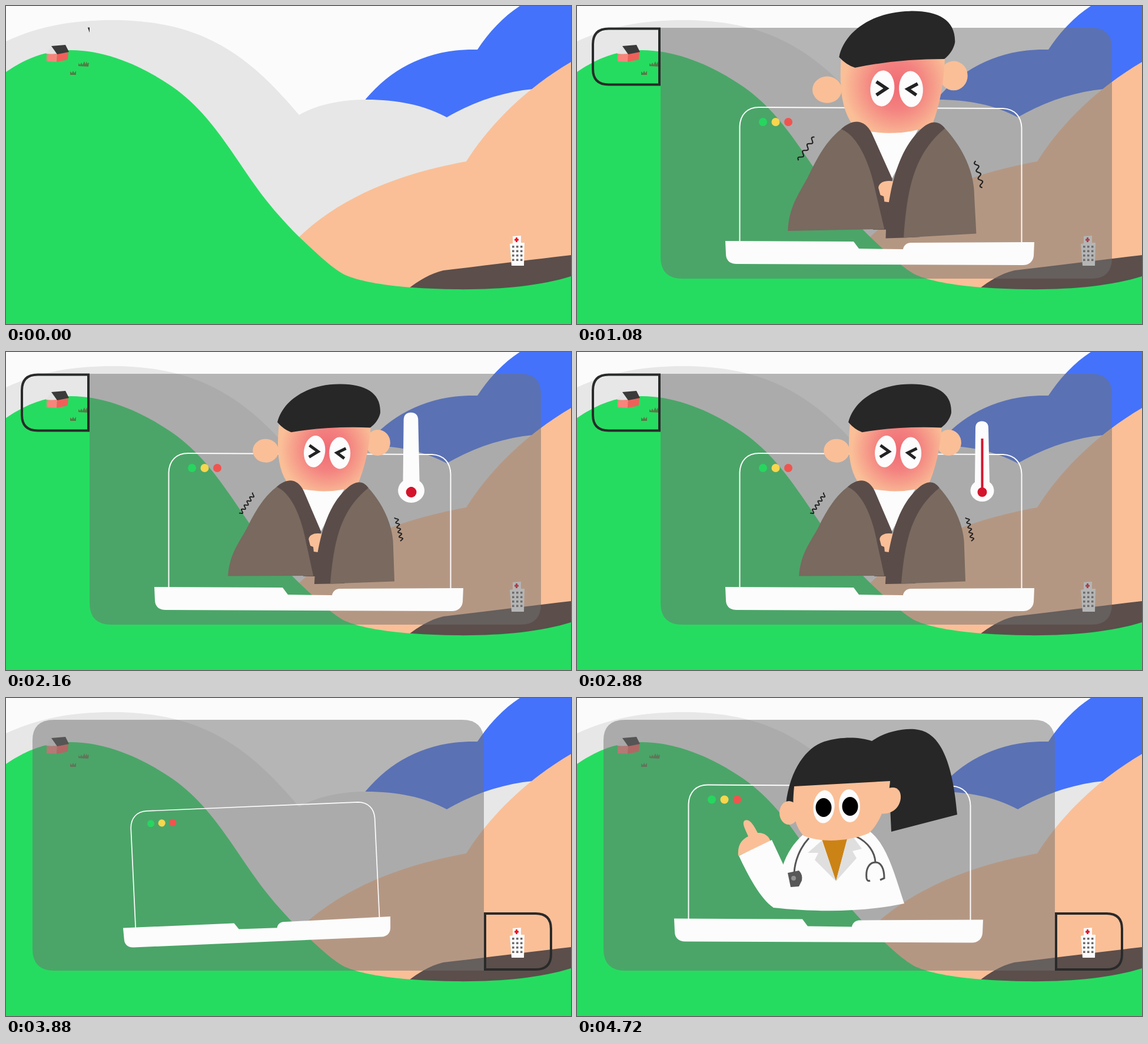
Recreate the animation shown at these times as an HTML page. Size 960x540 px, loop 4760 ms.

```html
<!DOCTYPE html>
<html lang="en">
<head>
<meta charset="utf-8">
<title>Remote consultation</title>
<style>
html, body { margin: 0; width: 100%; height: 100%; overflow: hidden; background: #fbfbfb; }
svg { display: block; width: 100%; height: 100%; }
.frame { fill: none; stroke: #292a2a; stroke-width: 4; }
.panel { fill: #707070; fill-opacity: .5; }
.skin { fill: #fabf97; }
.white { fill: #fcfcfc; }
.dark { fill: #272727; }
.line { fill: none; }
</style>
</head>
<body>
<svg viewBox="0 0 960 540" xmlns="http://www.w3.org/2000/svg">
<defs>
  <radialGradient id="fever" gradientUnits="userSpaceOnUse" cx="541" cy="165" r="80">
    <stop offset="0" stop-color="#f16a74"/>
    <stop offset=".45" stop-color="#f38280"/>
    <stop offset="1" stop-color="#fabf97"/>
  </radialGradient>
  <clipPath id="clipFrame"><polygon/></clipPath>
  <clipPath id="clipPanel"><polygon/></clipPath>
  <g id="laptop">
    <path class="line" stroke="#fcfcfc" stroke-width="2" d="M276.500 402V205C277 184 290 172 309 172L724 174C744 175 755 188 755.500 207V403"/>
    <path class="white" d="M252 399L470 400L479 412L554 413C555 407 559 403 566 402L777 401L776 424C775 434 768 440 758 440L271 438C259 438 253 431 253 421Z"/>
    <circle cx="316" cy="197" r="7" fill="#26d65f"/>
    <circle cx="337.500" cy="197" r="7" fill="#f8d64e"/>
    <circle cx="359" cy="197" r="7" fill="#f0544f"/>
  </g>
</defs>

<g id="land">
  <path fill="#4472fa" d="M605 166C650 108 715 72 801 74C820 45 845 18 873 0H960V300H605Z"/>
  <path fill="#e7e7e7" d="M0 60C60 32 120 24 180 24C330 24 410 80 498 185C530 166 575 159 612 159C665 159 710 168 749 189C795 162 845 146 895 141L960 141V540H0Z"/>
  <path class="skin" d="M490 400C565 324 670 284 782 264C820 204 880 142 960 95V500H490Z"/>
  <path fill="#5b4e4b" d="M680 483C702 465 722 454 743 449C820 440 890 431 960 423V500H680Z"/>
  <path fill="#26dc60" d="M0 112C35 88 70 75 110 75C170 75 230 102 275 132C320 161 350 199 380 242C420 300 440 334 498 392C530 422 555 446 577 457C605 469 650 475 690 478C790 485 890 481 960 459V540H0Z"/>
  <path fill="#e2e2e2" d="M68 81L77 68L88 83Z"/>
  <path fill="#f7857c" d="M69 82L87 81L86 95L69 94Z"/>
  <path fill="#f0605a" d="M87 81L106 78L105 91L86 95Z"/>
  <path fill="#3a3a3a" d="M77 68L101 66L107 78L87 82Z"/>
  <path fill="#547b46" d="M123 102V97L126 100L128 96L130 100L133 94L135 99L137 94L138 98L141 96L140 103ZM109 117V111L112 114L114 110L116 114L119 110V117Z"/>
  <path class="white" d="M861 391L875 390L875 402L881 402L880 441L859 441L856 404L861 403Z"/>
  <path class="line" stroke="#e2142c" stroke-width="3" d="M864 397H871M867.500 393V401"/>
  <path id="windows" fill="#6b6666"/>
</g>

<g id="call1">
  <path class="panel" clip-path="url(#clipPanel)" d="M142 37H874Q909 37 909 72V428Q909 463 874 463H179Q142 463 142 426Z"/>
  <path class="frame" clip-path="url(#clipFrame)" d="M140 38.500H54Q27 38.500 27 65V107Q27 133.500 54 133.500H140Z"/>
  <g id="lap1"><use href="#laptop"/></g>
  <g id="man">
    <path class="white" d="M498 228L574 228L533 305L527 305Z"/>
    <g id="manHead">
      <ellipse class="skin" cx="436" cy="171" rx="22" ry="20"/>
      <ellipse class="skin" cx="626" cy="150" rx="21" ry="22"/>
      <path fill="url(#fever)" d="M457 122C454 170 458 205 478 228C510 239 560 240 594 223C605 195 612 160 613 118Z"/>
      <path class="dark" d="M454 122C462 83 505 54 560 53C602 52 629 66 628 100C626 110 620 119 612 125Q540 125 478 138Q465 134 454 122Z"/>
      <ellipse class="white" cx="519" cy="169" rx="18" ry="27" transform="rotate(5 519 169)"/>
      <ellipse class="white" cx="562" cy="170" rx="18" ry="27" transform="rotate(-3 562 170)"/>
      <path class="line" stroke="#222" stroke-width="5" d="M510 159L525 169L510 179M572 162L557 170L570 179"/>
      <path id="drop" fill="#4a86f0" d="M540 201C543 207 544 210 543 213Q540 218 537 213C536 210 537 207 540 201Z"/>
    </g>
    <path fill="#5a4c49" d="M457 230C475 214 492 215 503 236L534 305L526 381H505Z"/>
    <path fill="#79695f" d="M377 383C379 340 400 320 412 292C428 260 440 244 457 230C482 240 500 280 509 325L522 380Z"/>
    <path class="skin" d="M513 318C514 309 526 306 537 309L531 340L522 339L521 331L516 329Z"/>
    <path fill="#5a4c49" d="M524 394C526 330 540 265 575 232C590 217 603 216 613 229L575 392L551 393Z"/>
    <path fill="#79695f" d="M613 229C640 258 657 295 657 330L660 387L551 393C556 320 566 268 613 229Z"/>
    <path id="wave1" class="line" stroke="#1e1e1e" stroke-width="1.800"/>
    <path id="wave2" class="line" stroke="#1e1e1e" stroke-width="1.800"/>
  </g>
  <g id="thermo">
    <path class="white" d="M677 129Q677 118 688 117.500Q699 118 699 129L701 221A20 18.500 0 1 1 676 221Z"/>
    <path id="mercury" class="line" stroke="#d4142c" stroke-width="4"/>
    <circle cx="688.500" cy="238" r="8" fill="#d4142c"/>
  </g>
</g>

<g id="call2">
  <path class="panel" clip-path="url(#clipPanel)" d="M812 463H82Q45 463 45 426V72Q45 37 82 37H775Q812 37 812 74Z"/>
  <path class="frame" clip-path="url(#clipFrame)" d="M814 366H900Q926 366 926 392V435Q926 461 900 461H814Z"/>
  <g id="lap2"><use href="#laptop" x="-87" y="-24.500"/></g>
  <g id="doctor">
    <path class="white" d="M384 232C366 248 355 268 350 284L333 356C400 363 480 365 556 349C540 300 526 248 498 227Z"/>
    <g id="arm">
      <path class="skin" d="M274 268C272 248 282 239 291 235C287 225 279 212 285 208C294 204 301 218 307 229C318 228 327 235 329 244Z"/>
      <path class="white" d="M275 268L331 241L352 286L380 340L334 356C312 342 290 300 275 268Z"/>
    </g>
    <path fill="#cb8316" d="M416 240L460 237L440 311Z"/>
    <path fill="#dfdfdf" d="M416 242L440 311L404 275L410 263L392 263ZM459 239L467 233L484 256L468 260L475 272L440 311Z"/>
    <g class="line" stroke="#555" stroke-width="3">
      <path d="M394 238C378 255 370 278 369 297M474 235C495 245 506 262 507 279"/>
      <path d="M498 310Q493 312 492 306C490 288 498 279 507 279C517 279 522 290 522 306L515 309"/>
    </g>
    <path fill="#585858" d="M358 297L377 293Q384 300 382 310L377 320L363 321Z"/>
    <circle cx="368" cy="306" r="4" fill="#919191"/>
    <g id="docHead">
      <path class="dark" d="M355 180C362 120 390 84 420 74C450 65 480 66 501 73C525 56 560 50 580 54C616 60 638 105 646 198L534 227L530 142L450 160L366 182Z"/>
      <ellipse class="skin" cx="360" cy="195" rx="16" ry="20"/>
      <path class="skin" d="M514 194L530 153C543 149 551 157 550 170C548 188 533 199 514 196Z"/>
      <path class="skin" d="M369 150L532 141C530 170 515 215 495 230C460 244 415 246 385 234C368 215 365 190 369 150Z"/>
      <ellipse class="white" cx="419.500" cy="184.500" rx="18" ry="28" transform="rotate(5 419 185)"/>
      <ellipse class="white" cx="463" cy="183" rx="18" ry="28" transform="rotate(-3 463 183)"/>
      <ellipse cx="419" cy="186" rx="13.500" ry="16"/>
      <ellipse cx="464" cy="184" rx="13.500" ry="16"/>
    </g>
  </g>
</g>
</svg>
<script>
const LOOP = 4760, SWITCH = 3120;
const $ = id => document.getElementById(id);
const unit = v => Math.min(1, Math.max(0, v));
const ramp = (t, start, length) => unit((t - start) / length);
const smooth = p => (1 - Math.cos(Math.PI * p)) / 2;
const backOut = p => 1 + 3 * (p - 1) ** 3 + 2 * (p - 1) ** 2;
const cycle = (t, peak, period) => Math.cos(2 * Math.PI * (t - peak) / period);
const turn = (id, angle, x, y) => $(id).setAttribute('transform', `rotate(${angle} ${x} ${y})`);

let holes = '';
for (let row = 0; row < 4; row++)
  for (let col = 0; col < 3; col++)
    holes += `M${860 + col * 7} ${407 + row * 7.500}h3.500v3.500h-3.500z`;
$('windows').setAttribute('d', holes);

function pop(id, t, start, length, x, y, tilt = 0, spin = 0) {
  const p = ramp(t, start, length), s = p > 0 ? backOut(p) : 0;
  const node = $(id);
  node.style.display = s > .001 ? '' : 'none';
  node.setAttribute('transform',
    `translate(${x} ${y}) rotate(${spin + tilt * (1 - s)}) scale(${s}) translate(${-x} ${-y})`);
}

// Uncovers from x in direction dir; one end of the slanted edge runs ahead.
function wipe(id, p, x, dir, span, lean, top, bottom) {
  const lead = x + dir * p * (span + lean), lag = lead - dir * lean;
  const [a, b] = dir * (lean > 0 ? 1 : 0) > 0 ? [lead, lag] : [lag, lead];
  const limit = v => dir > 0 ? Math.max(x, v) : Math.min(x, v);
  // The trailing end may still lie behind x, so the edge meets x part way.
  const behind = dir * (lag - x) < 0;
  const cut = behind ? unit(dir * (lead - x) / lean) : 1;
  const h = bottom - top;
  const points = a === lead
    ? [[x, top], [a, top], [limit(b), top + h * cut], [x, bottom]]
    : [[x, bottom], [b, bottom], [limit(a), bottom - h * cut], [x, top]];
  $(id).firstElementChild.setAttribute('points', points.join(' '));
}

function squiggle(id, x0, y0, x1, y1, waves, phase) {
  const len = Math.hypot(x1 - x0, y1 - y0);
  const nx = (y0 - y1) / len, ny = (x1 - x0) / len;
  let d = '';
  for (let i = 0; i <= 40; i++) {
    const u = i / 40, w = 2.800 * Math.sin(2 * Math.PI * waves * u + phase);
    d += `${i ? 'L' : 'M'}${x0 + (x1 - x0) * u + nx * w} ${y0 + (y1 - y0) * u + ny * w}`;
  }
  $(id).setAttribute('d', d);
}

function drawPatient(t) {
  const sway = (1 - cycle(t, 1560, 240)) / 2;
  pop('lap1', t, 680, 320, 515, 439, -20);
  pop('man', t, 880, 360, 520, 390, 0, sway);
  turn('manHead', 1.200 * sway, 530, 235);
  squiggle('wave1', 417 + 2 * sway, 242, 393 + 3 * sway, 277, 3.500 + 1.500 * sway, sway);
  squiggle('wave2', 659 + 2 * sway, 278, 669 + 2 * sway, 318, 3.500 + 1.500 * sway, sway);

  const fall = ((t - 1320) % 960) / 440;
  const visible = t >= 1320 && fall < 1;
  $('drop').style.display = visible ? '' : 'none';
  $('drop').setAttribute('transform', `translate(0 ${12 * (fall - 240 / 440)})`);

  pop('thermo', t, 1960, 320, 688, 238);
  const level = 230 - 83 * smooth(ramp(t, 2160, 560));
  $('mercury').setAttribute('d', `M688.500 238V${level}`);
}

function drawDoctor(t) {
  pop('lap2', t, 680, 320, 428, 414, -20);
  pop('doctor', t, 880, 360, 440, 362);
  const sway = 1 - cycle(t, 1600, 480);
  turn('arm', -4 * sway, 340, 345);
  turn('docHead', .6 * sway, 440, 240);
}

function draw(time) {
  const first = time < SWITCH, t = first ? time : time - SWITCH;
  $('call1').style.display = first ? '' : 'none';
  $('call2').style.display = first ? 'none' : '';
  const p = smooth(ramp(t, 74, 682)), q = smooth(ramp(t, -34, 330));
  if (first) {
    wipe('clipPanel', p, 142, 1, 767, 84, 37, 463);
    wipeFrame(q, 143, -1, 36, 136);
    drawPatient(t);
  } else {
    wipe('clipPanel', p, 812, -1, 767, 84, 37, 463);
    wipeFrame(q, 811, 1, 363, 464);
    drawDoctor(t);
  }
}

// The small frame opens with its upper edge ahead on the left, lower on the right.
function wipeFrame(p, x, dir, top, bottom) {
  const lean = 36, lead = p * (120 + lean);
  const lag = Math.max(0, lead - lean), cut = Math.min(1, lead / lean);
  const reach = (bottom - top) * cut;
  $('clipFrame').firstElementChild.setAttribute('points',
    [[x, top], [x + dir * lead, top], [x + dir * lag, top + reach], [x, top + reach]].join(' '));
}

const begin = performance.now();
function tick(now) {
  draw(Math.max(0, now - begin) % LOOP);
  requestAnimationFrame(tick);
}
draw(0);
requestAnimationFrame(tick);
</script>
</body>
</html>
```
